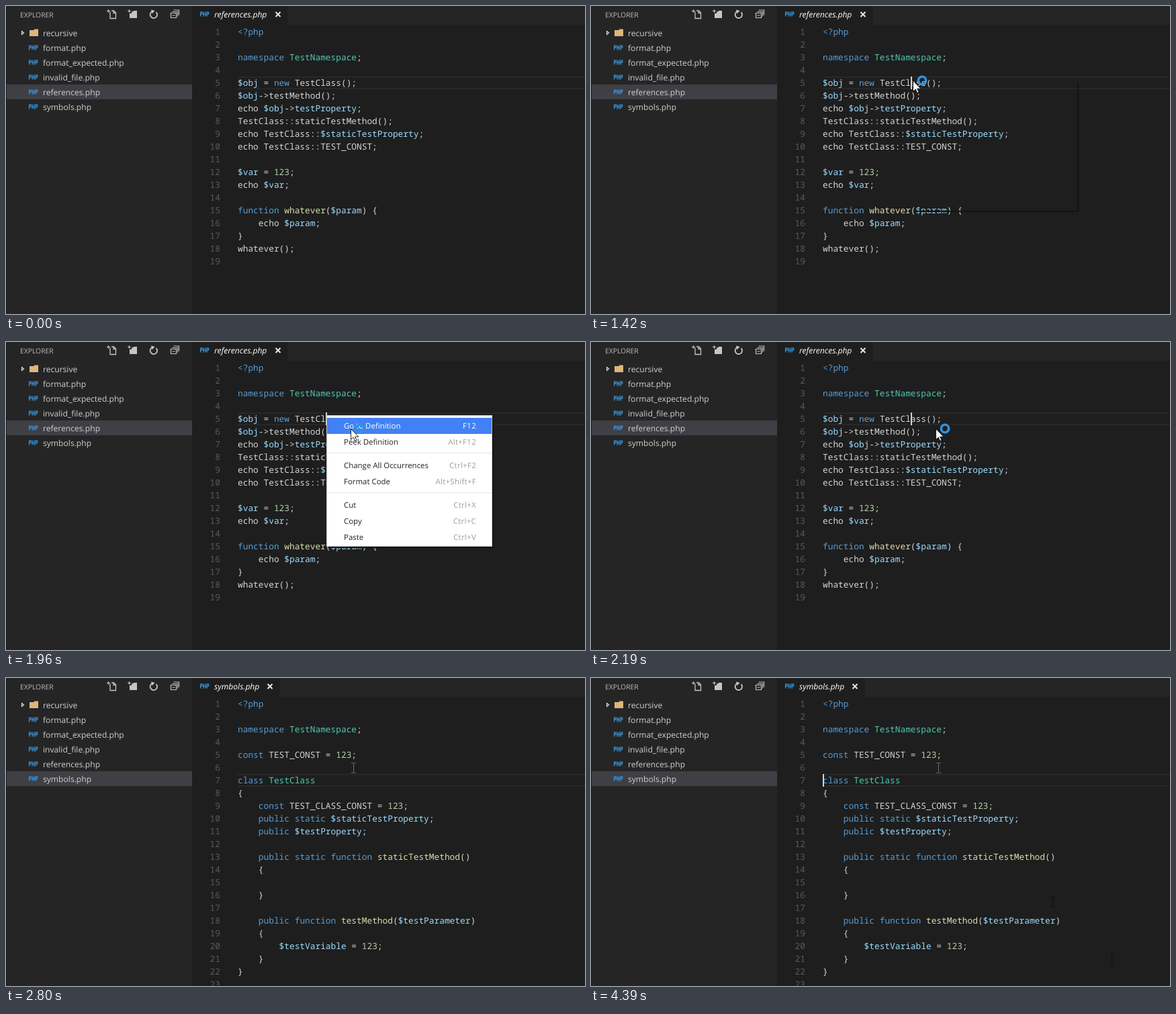
An HTML page for the animation above (4420 ms loop, 862 px wide and 459 px high).

```html
<!DOCTYPE html>
<html lang="en">
<head>
<meta charset="utf-8">
<title>Go to definition</title>
<style>
  html, body { margin: 0; width: 100%; height: 100%; overflow: hidden; background: #1e1e1e; }
  svg { display: block; text-rendering: geometricPrecision; }
  text { white-space: pre; font-family: "Open Sans", "Noto Sans", sans-serif; }
  .code text { font: 12.83px "Noto Sans Mono", "DejaVu Sans Mono", monospace; fill: #d4d4d4; }
  .code .num { fill: #5a5a5a; text-anchor: end; }
  .key { fill: #569cd6; }
  .type { fill: #4ec9b0; }
  .var { fill: #9cdcfe; }
  .fn { fill: #dcdcaa; }
  .lit { fill: #b5cea8; }
  .head { font-size: 10.35px; fill: #bbb; }
  .file { font-size: 12.1px; fill: #d0d0d0; }
  .tab { font-size: 12.1px; font-style: italic; fill: #fff; }
  .item { font-size: 11.45px; fill: #222; }
  .hint { font-size: 11.45px; letter-spacing: .3px; text-anchor: end; fill: #99a09c; }
  .hot .item, .hot .hint { fill: #fff; }
  .line { fill: none; stroke: #c5c5c5; }
</style>
</head>
<body>
<svg id="stage" width="862" height="459" viewBox="0 0 862 459"></svg>
<script>
const LOOP = 4420;

const usage = `<?php

namespace TestNamespace;

$obj = new TestClass();
$obj->testMethod();
echo $obj->testProperty;
TestClass::staticTestMethod();
echo TestClass::$staticTestProperty;
echo TestClass::TEST_CONST;

$var = 123;
echo $var;

function whatever($param) {
    echo $param;
}
whatever();
`;

const symbols = `<?php

namespace TestNamespace;

const TEST_CONST = 123;

class TestClass
{
    const TEST_CLASS_CONST = 123;
    public static $staticTestProperty;
    public $testProperty;

    public static function staticTestMethod()
    {

    }

    public function testMethod($testParameter)
    {
        $testVariable = 123;
    }
}
`;

const files = ['format.php', 'format_expected.php', 'invalid_file.php', 'references.php', 'symbols.php'];

// label, shortcut, text centre
const items = [
  ['Go to Definition', 'F12', 125],
  ['Peek Definition', 'Alt+F12', 149],
  ['Change All Occurrences', 'Ctrl+F2', 184],
  ['Format Code', 'Alt+Shift+F', 208],
  ['Cut', 'Ctrl+X', 243],
  ['Copy', 'Ctrl+C', 267],
  ['Paste', 'Ctrl+V', 291]
];

const rect = (x, y, w, h, fill) =>
  `<rect x="${x}" y="${y}" width="${w}" height="${h}" fill="${fill}"/>`;
const label = (x, y, cls, s) => `<text x="${x}" y="${y}" class="${cls}">${s}</text>`;
const group = (id, body, cls = '') => `<g id="${id}" class="${cls}">${body}</g>`;

const token = new RegExp([
  '(?<key><\\?php|\\b(?:namespace|new|function|const|class|public|static)\\b)',
  '(?<type>(?<=namespace |class )\\w+)',
  '(?<fn>(?<=function )\\w+)',
  '(?<var>\\$\\w+|(?<=->)\\w+(?![\\w(]))',
  '(?<lit>\\b\\d+)'
].join('|'), 'g');

function paint(line) {
  return line.replace(token, (...args) => {
    const kinds = args[args.length - 1];
    const kind = Object.keys(kinds).find(k => kinds[k]);
    return `<tspan class="${kind}">${args[0].replace('<', '&lt;')}</tspan>`;
  });
}

function code(source) {
  return source.split('\n').map((line, i) => {
    const y = 43 + 19 * i;
    return label(319, y, 'num', i + 1) + label(345, y, '', paint(line));
  }).join('');
}

const badge = (x, y) =>
  `<path transform="translate(${x} ${y - 3.5})" fill="none" stroke="#3794d6" stroke-width="1.3"
    d="M.6 7V.6H3V3.7H.6M5.2 0V7M8 0V7M5.2 3.5H8M10.2 7V.6H12.6V3.7H10.2"/>`;

function editor(id, name, tabEnd, source, row) {
  const top = 29 + 19 * (row - 1);
  const close = tabEnd - 14.5;
  return group(id,
    rect(1, id === 'before' ? 117 : 139, 276, 22, '#3f3f46') +
    rect(tabEnd, 0, 862 - tabEnd, 28, '#252526') +
    badge(289, 12) + label(310, 17, 'tab', name) +
    `<path d="M${close - 3.5} 9l7 7m0-7l-7 7" stroke="#e8e8e8" stroke-width="2"/>` +
    rect(345, top, 517, 2, '#282828') + rect(345, top + 17, 517, 2, '#282828') +
    group(id + 'Code', code(source), 'code'));
}

function sidebar() {
  const icons = `
    <path class="line" stroke-width="1.3" d="M155 8.500V18.500H163.500V10L160.500 7H157M160 7V10.500H163.500"/>
    <path class="line" stroke-width="1.2" d="M150 7.500h5M152.500 5v5M181 7.500h5M183.500 5v5"/>
    <path fill="#c5c5c5" d="M184 11H187V8.500H189L190 7H195V18H184Z"/>
    <path class="line" stroke-width="1.8" d="M223.500 9.200A5.200 5.200 0 1 1 217.300 8.300"/>
    <path fill="#c5c5c5" d="M216 5.500L221.500 7L217.500 11.500Z"/>
    <path class="line" stroke-width="1.2" d="M245.500 10.500h8v7h-8zM247.500 8.500h8v7M249.500 6h8v7.500M247.500 14h4"/>`;
  const folder = `<path fill="#e8e8e8" d="M23 36.500L27.500 40L23 43.500Z"/>
    <path fill="#252526" d="M24.200 38.800L25.800 40L24.200 41.200Z"/>
    <path fill="#dcb67a" d="M35 36H41L42.500 34.500H48V45H35Z"/>`;
  const rows = files.map((name, i) =>
    badge(34, 62 + 22 * i) + label(55, 67 + 22 * i, 'file', name)).join('');
  return label(21, 17, 'head', 'EXPLORER') + icons + folder + label(55, 45, 'file', 'recursive') + rows;
}

function menu() {
  const row = ([name, keys, y]) => label(503, y + 4, 'item', name) + label(700, y + 4, 'hint', keys);
  return rect(477, 109, 247, 196, '#c4c4c4') + rect(478, 110, 245, 194, '#fff') +
    rect(478, 165, 245, 1, '#e6e6e6') + rect(478, 224, 245, 1, '#e6e6e6') +
    group('first', `<rect id="bar" x="478" y="113" width="245" height="24" fill="#4281f4"/>` + row(items[0])) +
    items.slice(1).map(row).join('');
}

const beam = (id, color, x = 0, y = 0) =>
  `<path id="${id}" transform="translate(${x + .5} ${y})" fill="none" stroke="${color}"
    d="M-3.500-7.500H-1.500L0-6.500L1.500-7.500H3.500M0-6.500V6.500M-3.500 7.500H-1.500L0 6.500L1.500 7.500H3.500"/>`;

const arrow = `<path fill="#fff" stroke="#111" stroke-width=".9" stroke-linejoin="miter"
    d="M.5.500V16.500L4.200 13L6.700 18.500L9 17.500L6.600 12.200H11.800Z"/>
  <circle cx="14" cy="0" r="5.700" fill="none" stroke="#2f92df" stroke-width="3.600"/>`;

document.getElementById('stage').innerHTML =
  rect(0, 0, 862, 459, '#1e1e1e') + rect(1, 0, 276, 459, '#252526') +
  editor('before', 'references.php', 419.5, usage, 5) +
  editor('after', 'symbols.php', 407.5, symbols, 7) +
  sidebar() +
  `<rect id="caret" width="2" height="19" fill="#d4d4d4"/>` +
  group('shadow', rect(724, 115, 2, 192, '#131313') + rect(482, 305, 242, 2, '#131313')) +
  group('menu', menu()) +
  beam('rest', '#6c6c6c', 517, 134) +
  beam('trailA', '#0c0c0c', 687, 334) +
  beam('trailB', '#0e0e0e', 775, 419) +
  beam('trailC', '#192020', 788, 450) +
  beam('live', '#0a0a0a') +
  group('arrow', arrow);

const part = {};
document.querySelectorAll('[id]').forEach(el => part[el.id] = el);

// time, x, y; each place is held until the next one
const beamPath = [
  [270, 626, 422], [350, 596, 358], [420, 566, 296], [500, 538, 240],
  [580, 516, 196], [650, 501, 166], [730, 492, 149],
  [810, 488, 130], [880, 482, 111], [960, 483, 116], [1420],
  [3110, 548, 168], [3190, 598, 226], [3260, 648, 286], [3340, 687, 334],
  [3420, 708, 360], [3490, 720, 375],
  [3650, 775, 419], [3730, 817, 452], [3800]
];
const arrowPath = [
  [1420, 479, 111], [1730, 484, 113], [1810, 495, 119], [1880, 506, 125], [1960, 513, 129], [2650]
];

const held = (path, t) => path.filter(p => p[0] <= t).pop() || [];
const within = (t, a, b = LOOP) => t >= a && t < b;

function show(el, on) {
  el.setAttribute('visibility', on ? 'visible' : 'hidden');
}

function follow(el, path, t, shift) {
  const [, x, y] = held(path, t);
  show(el, x !== undefined);
  if (x !== undefined) el.setAttribute('transform', `translate(${x + shift} ${y})`);
}

function draw(t) {
  const opened = t >= 2270;
  const hot = t >= 1810;
  part.before.style.display = opened ? 'none' : '';
  part.after.style.display = opened ? '' : 'none';

  part.caret.setAttribute('x', opened ? 345 : 476);
  part.caret.setAttribute('y', opened ? 143 : 105);
  show(part.caret, within(t, 1420, 2800) || within(t, 3340, 3800) || t >= 4260);

  show(part.shadow, within(t, 1420, 2190));
  part.menu.style.display = within(t, 1500, 2190) ? '' : 'none';
  part.first.setAttribute('class', hot ? 'hot' : '');
  part.bar.style.display = hot ? '' : 'none';

  show(part.rest, t >= 2650);
  show(part.trailA, t >= 3340);
  show(part.trailB, t >= 3650);
  show(part.trailC, t >= 4260);
  follow(part.live, beamPath, t, .5);
  follow(part.arrow, arrowPath, t, 0);
}

function tick() {
  draw(performance.now() % LOOP);
  requestAnimationFrame(tick);
}
tick();
</script>
</body>
</html>
```
